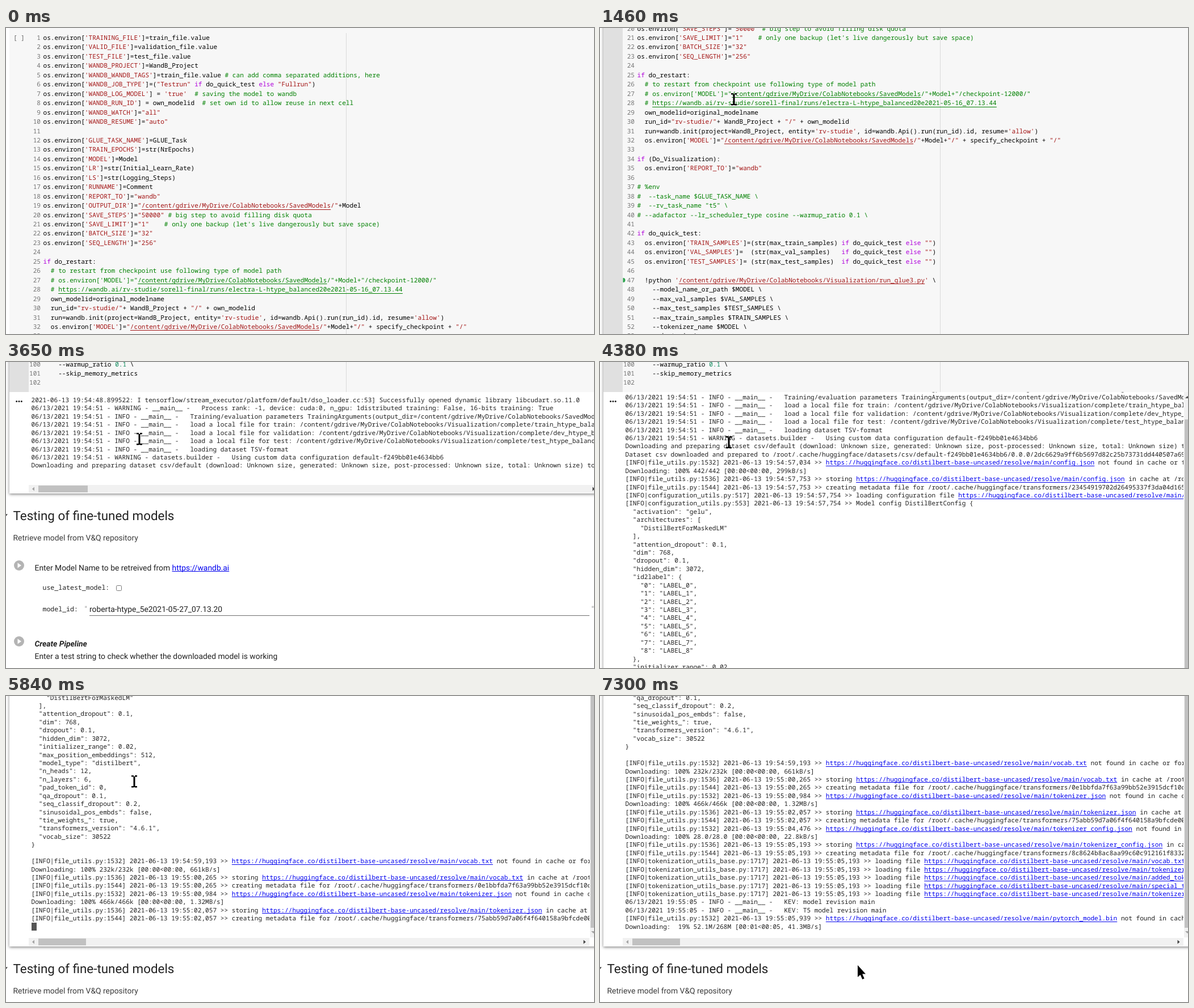
Animation of 1036x540 px, one loop 8 s. Source, as an HTML page with a canvas:

```html
<!DOCTYPE html>
<html lang="en">
<head>
<meta charset="utf-8">
<title>Notebook run</title>
<style>
html, body { margin: 0; width: 100%; height: 100%; overflow: hidden; background: #fff; }
canvas { display: block; }
</style>
</head>
<body>
<canvas id="stage" width="1036" height="540"></canvas>
<script>
const W = 1036, H = 540, LOOP = 8000, STEP = 730;
const ctx = document.getElementById('stage').getContext('2d');
const ADV = 6.667, CODE_PITCH = 16.45, LOG_PITCH = 14.43;
const CODE_END = 1695, LOG_TOP = 1709.5;
const MONO = '11.11px "Noto Sans Mono", monospace';
const LABEL = '500 11.55px "Noto Sans Mono", monospace';
const SANS = '13.86px Roboto, sans-serif';
const TITLE = '22.4px Roboto, sans-serif';
const INK = '#212121', LINK = '#0000ee';

const head = String.raw`os.environ['TRAINING_FILE']=train_file.value
os.environ['VALID_FILE']=validation_file.value
os.environ['TEST_FILE']=test_file.value
os.environ['WANDB_PROJECT']=WandB_Project
os.environ['WANDB_WANDB_TAGS']=train_file.value # can add comma separated additions, here
os.environ['WANDB_JOB_TYPE']=("Testrun" if do_quick_test else "Fullrun")
os.environ['WANDB_LOG_MODEL'] = 'true'  # saving the model to wandb
os.environ['WANDB_RUN_ID'] = own_modelid  # set own id to allow reuse in next cell
os.environ['WANDB_WATCH']="all"
os.environ['WANDB_RESUME']="auto"

os.environ['GLUE_TASK_NAME']=GLUE_Task
os.environ['TRAIN_EPOCHS']=str(NrEpochs)
os.environ['MODEL']=Model
os.environ['LR']=str(Initial_Learn_Rate)
os.environ['LS']=str(Logging_Steps)
os.environ['RUNNAME']=Comment
os.environ['REPORT_TO']="wandb"
os.environ['OUTPUT_DIR']="/content/gdrive/MyDrive/ColabNotebooks/SavedModels/"+Model
os.environ['SAVE_STEPS']="50000" # big step to avoid filling disk quota
os.environ['SAVE_LIMIT']="1"    # only one backup (let's live dangerously but save space)
os.environ['BATCH_SIZE']="32"
os.environ['SEQ_LENGTH']="256"

if do_restart:
  # to restart from checkpoint use following type of model path
  # os.environ['MODEL']="/content/gdrive/MyDrive/ColabNotebooks/SavedModels/"+Model+"/checkpoint-12000/"
  # https://wandb.ai/rv-studie/sorell-final/runs/electra-L-htype_balanced20e2021-05-16_07.13.44
  own_modelid=original_modelname
  run_id="rv-studie/"+ WandB_Project + "/" + own_modelid
  run=wandb.init(project=WandB_Project, entity='rv-studie', id=wandb.Api().run(run_id).id, resume='allow')
  os.environ['MODEL']="/content/gdrive/MyDrive/ColabNotebooks/SavedModels/"+Model+"/" + specify_checkpoint + "/"

if (Do_Visualization):
  os.environ['REPORT_TO']="wandb"

# %env
#  --task_name $GLUE_TASK_NAME \
#  --rv_task_name "t5" \
# --adafactor --lr_scheduler_type cosine --warmup_ratio 0.1 \

if do_quick_test:
  os.environ['TRAIN_SAMPLES']=(str(max_train_samples) if do_quick_test else "")
  os.environ['VAL_SAMPLES']=  (str(max_val_samples)   if do_quick_test else "")
  os.environ['TEST_SAMPLES']= (str(max_test_samples)  if do_quick_test else "")

  !python '/content/gdrive/MyDrive/ColabNotebooks/Visualization/run_glue3.py' \
    --model_name_or_path $MODEL \
    --max_val_samples $VAL_SAMPLES \
    --max_test_samples $TEST_SAMPLES \
    --max_train_samples $TRAIN_SAMPLES \
    --tokenizer_name $MODEL \
    --do_train \
`.trimEnd().split('\n');

const tail = String.raw`do_train \
do_eval \
do_predict \
max_seq_length $SEQ_LENGTH \
per_device_train_batch_size $BATCH_SIZE \
per_device_eval_batch_size=64 \
learning_rate $LR \
num_train_epochs $TRAIN_EPOCHS \
output_dir $OUTPUT_DIR \
overwrite_output_dir \
logging_steps $LS \
run_name $RUNNAME \
report_to $REPORT_TO \
train_file $TRAINING_FILE \
validation_file $VALID_FILE \
test_file $TEST_FILE \
save_steps $SAVE_STEPS \
save_total_limit $SAVE_LIMIT \
fp16 \
adafactor --lr_scheduler_type cosine \
warmup_ratio 0.1 \
skip_memory_metrics
`.trimEnd().split('\n').map(s => '    --' + s);

const code = [
  ...head.map((text, i) => ({ n: i + 1, text })),
  ...[...tail, ''].map((text, i) => ({ n: i + 80, text }))
];

// Log output
const HUB = 'https://huggingface.co/distilbert-base-uncased/resolve/main/';
const CACHE = '/root/.cache/huggingface/';
const DRIVE = '/content/gdrive/MyDrive/ColabNotebooks/';
const info = (src, time, msg) => `[INFO|${src}] 2021-06-13 19:${time} >> ${msg}`;
const note = (msg, who = 'INFO - __main__', sec = '54:51') => `06/13/2021 19:${sec} - ${who} -   ${msg}`;
const local = (kind, file) =>
  note(`load a local file for ${kind}: ${DRIVE}Visualization/complete/${file}_htype_balanced.tsv`);

const labels = (name, row) => [
  `  "${name}": {`,
  ...Array.from({ length: 9 }, (_, i) => '    ' + row(i) + (i < 8 ? ',' : '')),
  '  },'
];

const config = full => [
  info('configuration_utils.py:517', '54:57,754', `loading configuration file ${HUB}config.json`),
  info('configuration_utils.py:553', '54:57,754', 'Model config DistilBertConfig {'),
  '  "activation": "gelu",', '  "architectures": [', '    "DistilBertForMaskedLM"', '  ],',
  '  "attention_dropout": 0.1,', '  "dim": 768,', '  "dropout": 0.1,', '  "hidden_dim": 3072,',
  ...(full ? labels('id2label', i => `"${i}": "LABEL_${i}"`) : []),
  '  "initializer_range": 0.02,',
  ...(full ? labels('label2id', i => `"LABEL_${i}": ${i}`) : []),
  '  "max_position_embeddings": 512,', '  "model_type": "distilbert",', '  "n_heads": 12,',
  '  "n_layers": 6,', '  "pad_token_id": 0,', '  "qa_dropout": 0.1,', '  "seq_classif_dropout": 0.2,',
  '  "sinusoidal_pos_embds": false,', '  "tie_weights_": true,', '  "transformers_version": "4.6.1",',
  '  "vocab_size": 30522', '}', ''
];

const missing = (file, time) =>
  info('file_utils.py:1532', time, `${HUB}${file} not found in cache or force_download set to True`);
const fetched = (file, start, end, size, rate, hash) => [
  missing(file, start),
  `Downloading: 100% ${size}/${size} [00:00<00:00, ${rate}B/s]`,
  info('file_utils.py:1536', end, `storing ${HUB}${file} in cache at ${CACHE}transformers`),
  info('file_utils.py:1544', end, `creating metadata file for ${CACHE}transformers/${hash}`)
];

const log = [
  '2021-06-13 19:54:48.899522: I tensorflow/stream_executor/platform/default/dso_loader.cc:53] Successfully opened dynamic library libcudart.so.11.0',
  note('Process rank: -1, device: cuda:0, n_gpu: 1distributed training: False, 16-bits training: True', 'WARNING - __main__'),
  note(`Training/evaluation parameters TrainingArguments(output_dir=${DRIVE}SavedModels/`),
  local('train', 'train'), local('validation', 'dev'), local('test', 'test'),
  note('loading dataset TSV-format'),
  note('Using custom data configuration default-f249bb01e4634bb6', 'WARNING - datasets.builder'),
  'Downloading and preparing dataset csv/default (download: Unknown size, generated: Unknown size, post-processed: Unknown size, total: Unknown size) to /root',
  `Dataset csv downloaded and prepared to ${CACHE}datasets/csv/default-f249bb01e4634bb6/0.0.0/2dc6629a9ff6b5697d82c25b73731dd440507a69`,
  ...fetched('config.json', '54:57,034', '54:57,753', '442', '299k', '23454919702d26495337f3da04d1655c'),
  ...config(true),
  ...config(false),
  ...fetched('vocab.txt', '54:59,193', '55:00,265', '232k', '661k', '0e1bbfda7f63a99bb52e3915dcf10c3c'),
  ...fetched('tokenizer.json', '55:00,984', '55:02,057', '466k', '1.32M', '75abb59d7a06f4f640158a9bfcde005264'),
  ...fetched('tokenizer_config.json', '55:04,476', '55:05,193', '28.0', '22.8k', '8c8624b8ac8aa99c60c912161f8332de'),
  ...['vocab.txt', 'tokenizer.json', 'added_tokens.json', 'special_tokens_map.json', 'tokenizer_config.json']
    .map(f => info('tokenization_utils_base.py:1717', '55:05,193', `loading file ${HUB}${f}`)),
  note('KEV: model revision main', undefined, '55:05'),
  note('KEV: T5 model revision main', undefined, '55:05'),
  missing('pytorch_model.bin', '55:05,939'),
  'Downloading:  19% 52.1M/268M [00:01<00:05, 41.3MB/s]'
];

// One entry per step: page scroll, cell bottom, log lines, log scroll, pointer
const LONG = { bottom: 2553, vbar: true, hbar: true };
const states = [
  { top: 0, bottom: 1743, lines: 0, idle: true },
  { top: 164.5, bottom: 1743, lines: 0, beam: [236, 126] },
  { top: 329, bottom: 1743, lines: 0, beam: [236, 126] },
  { top: 1314, bottom: 1743, lines: 1, beam: [236, 127] },
  { top: 1642, bottom: 1874, lines: 9, hbar: true, beam: [236, 127] },
  { top: 1642, bottom: 1874, lines: 9, hbar: true, beam: [235, 136] },
  { ...LONG, top: 1642, lines: 60, inner: 34, beam: [227, 142] },
  { ...LONG, top: 1970, lines: 86, inner: 432, block: true, beam: [226, 147] },
  { ...LONG, top: 2111, lines: 92, inner: 519, block: true, beam: [226, 151] },
  { ...LONG, top: 2111, lines: 94, inner: 548, block: true, beam: [226, 151] },
  { ...LONG, top: 2111, lines: 105, inner: 692, arrow: [454, 475] }
];

function rect(x, y, w, h, color) {
  ctx.fillStyle = color;
  ctx.fillRect(x, y, w, h);
}

function poly(points, color) {
  ctx.beginPath();
  points.forEach(([x, y]) => ctx.lineTo(x, y));
  ctx.closePath();
  ctx.fillStyle = color;
  ctx.fill();
}

function disc(x, y, r, color) {
  ctx.beginPath();
  ctx.arc(x, y, r, 0, Math.PI * 2);
  ctx.fillStyle = color;
  ctx.fill();
}

function print(text, x, y, font, color = INK) {
  ctx.font = font;
  ctx.fillStyle = color;
  ctx.fillText(text, x, Math.round(y));
}

function underline(x, y, w, color) {
  rect(x, Math.round(y), w, 1, color);
}

const TOKENS = /(#.*)|("[^"]*"|'[^']*')|\b(if|else)\b|\b(\d[\d.]*)\b/g;
const HUES = ['#000', '#008000', '#a31515', '#af00db', '#098658'];

function codeLine(text, y) {
  const x0 = 65.5;
  let last = 0;
  const put = (s, at, color) => print(s, x0 + at * ADV, y + 3.5, MONO, color);
  for (const m of text.matchAll(TOKENS)) {
    put(text.slice(last, m.index), last, HUES[0]);
    put(m[0], m.index, HUES[m.findIndex((g, i) => i && g)]);
    last = m.index + m[0].length;
  }
  put(text.slice(last), last, HUES[0]);
  const link = text.match(/\/content[\w\/.]*\w|https:\S+/);
  if (link) {
    const hue = text.trim()[0] === '#' ? HUES[1] : HUES[2];
    underline(x0 + link.index * ADV, y + 6, link[0].length * ADV, hue);
  }
}

function logLine(text, y) {
  const x0 = 44.5, link = text.match(/https:\S+/);
  if (!link) return print(text, x0, y + 3.5, MONO);
  const at = link.index, end = at + link[0].length;
  print(text.slice(0, at), x0, y + 3.5, MONO);
  print(link[0], x0 + at * ADV, y + 3.5, MONO, LINK);
  print(text.slice(end), x0 + end * ADV, y + 3.5, MONO);
  underline(x0 + at * ADV, y + 5, link[0].length * ADV, LINK);
}

function drawCode(s) {
  const end = Math.max(0, CODE_END - s.top);
  rect(6, 0, W, end, '#f7f7f7');
  if (!s.idle) rect(6, 0, 34, end, '#e0e0e0');
  const rule = Math.max(0, 9 - s.top);
  if (end > rule) rect(599, rule, 1, end - rule, '#d9d9d9');
  ctx.save();
  ctx.beginPath();
  ctx.rect(0, 0, W, end);
  ctx.clip();
  if (s.idle) print('[ ]', 13, 21, MONO, '#616161');
  else {
    ctx.beginPath();
    ctx.arc(40.5, 774 - s.top, 4, -Math.PI / 2, Math.PI / 2);
    ctx.fillStyle = '#2ba24c';
    ctx.fill();
  }
  for (const { n, text } of code) {
    const y = 17.5 + (n - 1) * CODE_PITCH - s.top;
    if (y < -12 || y > H + 12) continue;
    print(String(n), 61 - String(n).length * ADV, y + 3.5, MONO, '#757575');
    codeLine(text, y);
  }
  ctx.restore();
}

function drawBars(s, right) {
  const bottom = s.bottom - s.top, top = CODE_END - s.top;
  if (s.hbar) {
    const y = Math.round(bottom - 8.5);
    rect(40, y - 7, right - 40, 14, '#f1f1f1');
    rect(57, y - 6, s.vbar ? 84 : 87, 12, '#c1c1c1');
    poly([[46, y], [50, y - 3.5], [50, y + 3.5]], '#a3a3a3');
    const tip = s.vbar ? 1021.5 : 1037.5;
    poly([[tip, y], [tip - 4, y - 3.5], [tip - 4, y + 3.5]], '#404040');
  }
  if (s.vbar) {
    const view = bottom - 16 - top, track = view - 34, full = view + s.inner;
    rect(1029, top, 7, view, '#f1f1f1');
    rect(1030, top + 17 + track * s.inner / full, 6, track * view / full, '#c1c1c1');
    poly([[1035, top + 7], [1031, top + 11], [1039, top + 11]], '#505050');
    const low = bottom - 27;
    poly([[1035, low + 4], [1031, low], [1039, low]], '#a3a3a3');
  }
}

function drawOutput(s) {
  const top = CODE_END - s.top, bottom = s.bottom - s.top, right = s.vbar ? 1028 : W;
  if (top > H) return;
  rect(6, top, W, bottom - top, '#fff');
  for (const x of [18.7, 23, 27.3]) disc(x, top + 16.5, 1.5, INK);
  ctx.save();
  ctx.beginPath();
  ctx.rect(40, top, right - 40, bottom - top - (s.hbar ? 16 : 0));
  ctx.clip();
  const base = LOG_TOP - s.top - (s.inner || 0);
  for (let i = 0; i < s.lines; i++) {
    const y = base + i * LOG_PITCH;
    if (y > -12 && y < H + 12) logLine(log[i], y);
  }
  if (s.block) rect(45, Math.round(base + s.lines * LOG_PITCH - 7), 9, 14, '#555');
  ctx.restore();
  drawBars(s, right);
}

function playButton(y) {
  disc(23, y, 9, '#b4b4b4');
  poly([[20.5, y - 4.5], [20.5, y + 4.5], [27, y]], '#fff');
}

function drawBelow(s) {
  const y = s.bottom - s.top + 38.5;
  if (y > H + 20) return;
  poly([[-5, y - 2], [3, y - 2], [-1, y + 2.5]], '#333');
  print('Testing of fine-tuned models', 12.5, y + 8, TITLE);
  print('Retrieve model from V&Q repository', 12.5, y + 44.5, SANS, '#3c3c3c');
  if (y > 450) return;
  playButton(y + 88.5);
  const lead = 'Enter Model Name to be retreived from ';
  print(lead, 50.5, y + 97, SANS);
  const x = 50.5 + ctx.measureText(lead).width, url = 'https://wandb.ai';
  print(url, x, y + 97, SANS, LINK);
  underline(x, y + 98.5, ctx.measureText(url).width, LINK);
  print('use_latest_model:', 64.5, y + 131, LABEL);
  ctx.strokeStyle = '#767676';
  ctx.lineWidth = 1;
  ctx.beginPath();
  ctx.roundRect(194.5, Math.round(y + 123) + 0.5, 9, 9, 2);
  ctx.stroke();
  print('model_id:', 64.5, y + 169.5, LABEL);
  for (const q of [138.5, 1031.5]) print('"', q, y + 170, SANS, '#9a9a9a');
  print('roberta-htype_5e2021-05-27_07.13.20', 147, y + 170.5, SANS);
  rect(147, Math.round(y + 176), 881, 1, '#6f6f6f');
  playButton(y + 222.5);
  print('Create Pipeline', 50.5, y + 231, 'italic bold ' + SANS);
  print('Enter a test string to check whether the downloaded model is working', 50.5, y + 253, SANS);
}

function drawPointer(s) {
  if (s.beam) {
    const [x, y] = s.beam;
    rect(x - 1.5, y - 9, 3, 19, '#000');
    for (const end of [y - 11, y + 8]) {
      rect(x - 5, end, 4, 2.5, '#000');
      rect(x + 1, end, 4, 2.5, '#000');
    }
  }
  if (s.arrow) {
    ctx.save();
    ctx.translate(...s.arrow);
    poly([[0, 0], [0, 21], [4.7, 17], [8.3, 25], [11.7, 23.5], [8.2, 15.5], [14, 15.5]], '#000');
    ctx.restore();
  }
}

function draw(s) {
  ctx.textRendering = 'geometricPrecision';
  rect(0, 0, W, H, '#fff');
  if (!s.idle) {
    ctx.save();
    ctx.shadowColor = 'rgba(0,0,0,.5)';
    ctx.shadowBlur = 5;
    ctx.shadowOffsetY = 1.5;
    rect(6, -20, W + 20, s.bottom - s.top + 20, '#fff');
    ctx.restore();
  }
  drawCode(s);
  drawOutput(s);
  drawBelow(s);
  drawPointer(s);
}

const start = performance.now();
function tick() {
  const t = (performance.now() - start) % LOOP;
  draw(states[Math.min(states.length - 1, Math.floor(t / STEP))]);
  requestAnimationFrame(tick);
}
tick();
</script>
</body>
</html>
```
